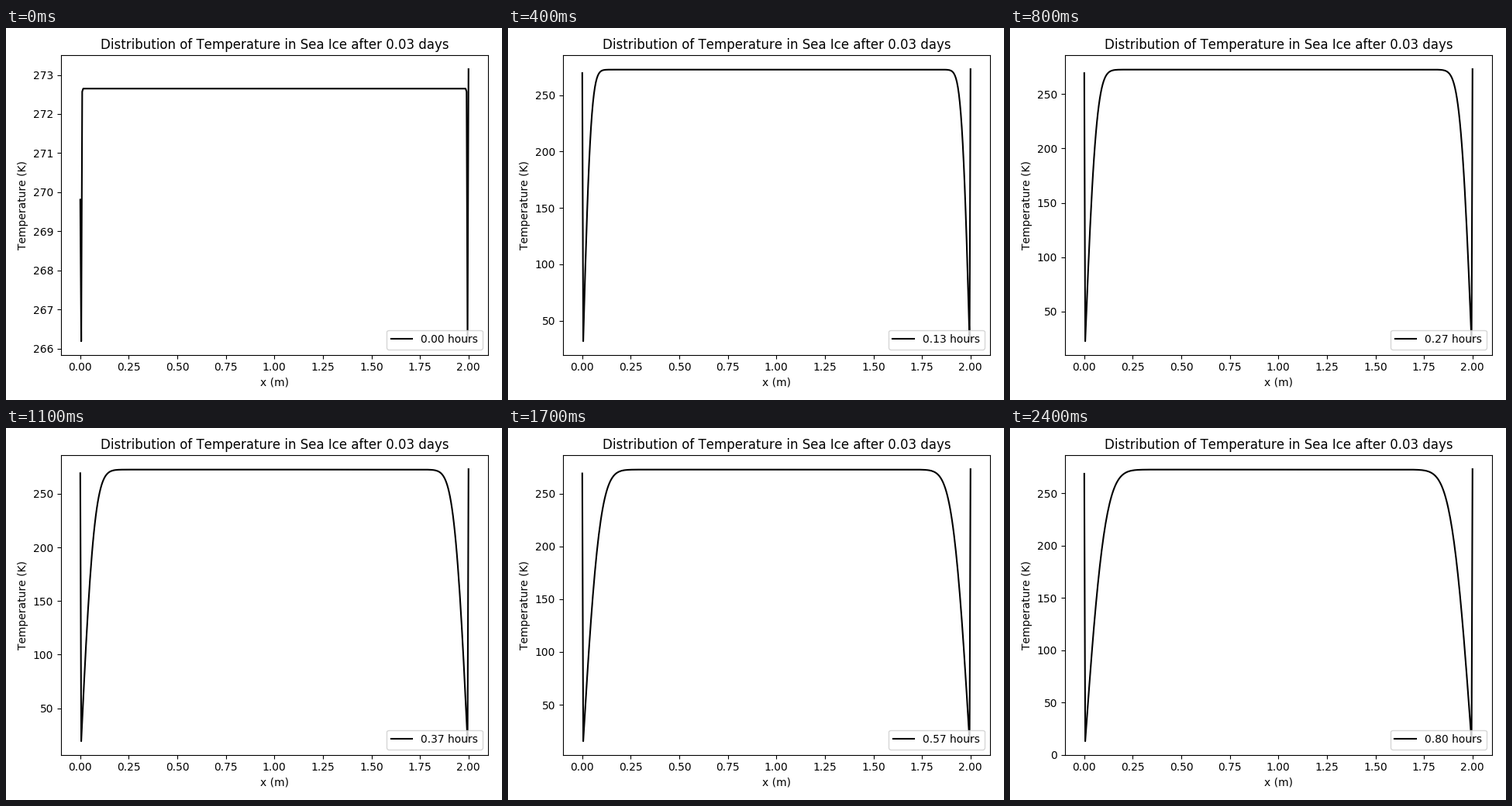
Recreate the animation shown at these times as a matplotlib script. Size 640x480 px, loop 2.5 s.

```python
import numpy as np
import matplotlib.pyplot as plt
from matplotlib.animation import FuncAnimation

W, H, DPI = 640, 480, 100
FRAMES, INTERVAL = 25, 100

CELLS, LENGTH = 400, 2.0
T_START, T_BOTTOM = 272.65, 273.15
R = 0.02427                # diffusivity * dt / dx^2
STEPS = 240                # half-second steps per picture

x = np.linspace(0, LENGTH, CELLS + 1)

# Crank-Nicolson on the inner nodes, written in its sine modes
m = np.arange(1, CELLS)
modes = np.sin(np.pi * np.outer(m, m) / CELLS)
weights = 2 / CELLS * modes.sum(axis=0) * T_START
damp = 2 * R * np.sin(np.pi * m / (2 * CELLS)) ** 2
growth = (1 - damp) / (1 + damp)


def profile(i):
    inner = modes @ (weights * growth ** max(1, STEPS * i))
    surface = 269.81 - 1.1 * i / (FRAMES - 1)
    return np.concatenate([[surface], inner, [T_BOTTOM]])


plt.rcParams["font.family"] = "DejaVu Sans"
plt.rcParams["text.kerning_factor"] = 6    # whole-pixel kerning
fig = plt.figure(figsize=(W / DPI, H / DPI), dpi=DPI)
left, right, top, bottom = 70.78, 621.84, 35.42, 421.72
ax = fig.add_axes([left / W, 1 - bottom / H, (right - left) / W, (bottom - top) / H])
ax.set_title("Distribution of Temperature in Sea Ice after 0.03 days")
ax.set_xlabel("x (m)")
ax.set_ylabel("Temperature (K)")
ax.set_xlim(-0.05 * LENGTH, 1.05 * LENGTH)

line, = ax.plot(x, profile(0), color="k", label="0.00 hours")
label = ax.legend(loc="lower right").get_texts()[0]


def update(i):
    temp = profile(i)
    line.set_ydata(temp)
    pad = 0.05 * np.ptp(temp)
    ax.set_ylim(temp.min() - pad, temp.max() + pad)
    label.set_text(f"{i / 30:.2f} hours")
    return line, label


anim = FuncAnimation(fig, update, frames=FRAMES, interval=INTERVAL,
                     repeat=True, repeat_delay=0, blit=False)
plt.show()
```
